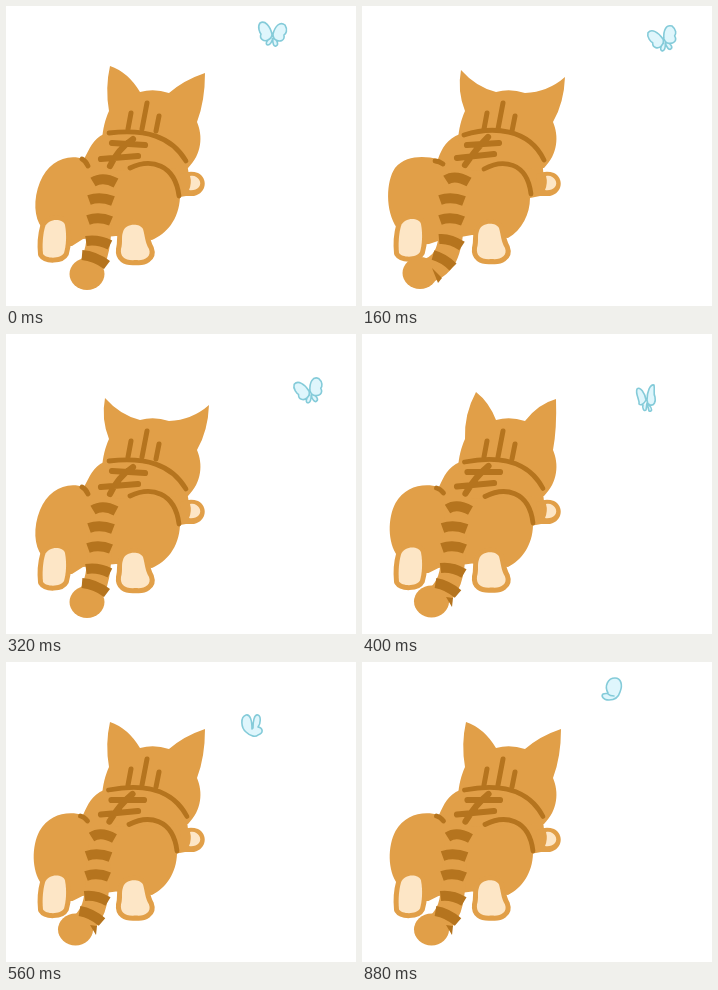
An HTML page with a canvas that plays this animation: 350x300 px, repeating every 0.96 s.

```html
<!DOCTYPE html>
<html>
<head>
<meta charset="utf-8">
<title>Cat watching a butterfly</title>
<style>
html, body { margin: 0; width: 100%; height: 100%; overflow: hidden; background: #fff; }
canvas { display: block; }
</style>
</head>
<body>
<canvas id="stage" width="350" height="300"></canvas>
<script>
const ctx = document.getElementById('stage').getContext('2d');
const FUR = '#e19f48', DARK = '#b5741e', CREAM = '#fde6c6', WING = '#dff6fc', EDGE = '#84cbd9';
const STEP = 80, STEPS = 12;

// Blend two path strings that share the same commands.
function mix(a, b, k) {
  const to = b.match(/-?[\d.]+/g);
  let i = 0;
  return a.replace(/-?[\d.]+/g, n => +n + (to[i++] - n) * k);
}

function fill(d, color) {
  ctx.fillStyle = color;
  ctx.fill(new Path2D(d));
}

function stroke(d, color, width, cap = 'round') {
  ctx.strokeStyle = color;
  ctx.lineWidth = width;
  ctx.lineCap = cap;
  ctx.lineJoin = 'round';
  ctx.stroke(new Path2D(d));
}

// Each pair is the body swung right and swung left.
const body = [
  'M98 128C87 133 84 142 78 153C60 147 42 156 34 176C27 193 28 212 36 222L38 240L66 240L77 233L110 230L146 234C160 228 173 214 174 191L186 189L180 150Z',
  'M98 128C85 133 80 142 76 153C62 150 44 149 33 162C24 175 23 205 35 222L38 240L67 238L76 235L110 229L146 232C160 224 168 208 168 192L183 189L180 150Z'];
const tail = [
  'M100 169C95 190 95 200 94 213C93 235 92 250 81 268',
  'M96 168C90 190 90 200 90 213C89 245 84 262 58 267'];
const stripes = [
  'M87 176Q97 170 110 177M83 194Q94 190 107 195M82 214Q93 210 105 215M80 235Q92 233 104 239M76 249Q89 250 101 259',
  'M84 174Q93 168 107 176M78 194Q89 190 102 195M78 214Q89 210 101 215M77 233Q88 232 100 240M71 249Q82 252 91 261'];
const tailWedge = ['M98 264L102 256L104 269Z', 'M70 262L80 272L76 277Z'];
const marks = [
  'M103 127C140 123 165 130 180 155M124 162C145 152 169 158 173 190M76 153Q80 155 82 160',
  'M102 129C130 120 167 122 182 154M122 163C140 153 165 155 169 188M73 155Q77 155 81 158'];
const spine = [
  'M127 133Q112 143 104 160M106 137L139 139M95 153L132 150',
  'M126 131Q114 143 103 159M105 139L137 137M95 152L132 148'];
const feet = [
  'M39 221C42 212 57 212 59 219C61 230 60 240 58 247C55 253 40 253 37 248C36 238 37 228 39 221Z',
  'M117 226C119 217 134 217 137 223C139 230 139 236 143 243C146 251 138 255 130 254C119 255 114 251 115 243C117 236 115 231 117 226Z'];

// Relaxed, flattened and perked ears: outer bend, tip, inner bend.
const ears = [
  { left: ['99 82', '104 60', '122 66'], right: ['178 74', '199 67', '199 95'] },
  { left: ['95 85', '99 64', '114 81'], right: ['186 86', '203 71', '202 97'] },
  { left: ['102 80', '114 58', '127 68'], right: ['176 70', '194 65', '195 95'] }];
const earSteps = [0, 0, 1, 1, 1, 2, 0, 0, 0, 0, 0, 0];

function drawCat(step) {
  const k = [0, .5, 1, .5][step % 4];
  const pose = pair => mix(...pair, k);

  fill(pose(body), FUR);
  fill('M175 168Q184 164 192 167C202 172 201 187 188 190L172 190Z', FUR);
  fill('M184 170C191 168 197 176 193 181Q189 185 183 184Q186 177 184 170Z', CREAM);

  const { left: l, right: r } = ears[earSteps[step]];
  fill(`M96 134C97 122 99 114 103 105Q${l[0]} ${l[1]}Q${l[2]} 134 86Q148 82 163 87` +
    `Q${r[0]} ${r[1]}Q${r[2]} 191 116C197 130 196 148 182 162L110 165Z`, FUR);

  ctx.save();
  ctx.translate(0, -k);
  for (const foot of feet) {
    stroke(foot, FUR, 10);
    fill(foot, CREAM);
  }
  ctx.restore();

  const tailPath = pose(tail);
  stroke(tailPath, FUR, 24, 'butt');
  const [x, y] = tailPath.match(/[\d.]+/g).slice(-2).map(Number);
  ctx.beginPath();
  ctx.ellipse(x, y, 17.5, 16, 0, 0, 7);
  ctx.fill();
  stroke(pose(stripes), DARK, 10, 'butt');
  if (k) fill(pose(tailWedge), DARK);

  stroke('M125 107L122 123M141 97L136 123M153 110L150 125', DARK, 5);
  stroke(pose(marks), DARK, 4.8);
  stroke(pose(spine), DARK, 6.2);
}

const wings = {
  open: 'M0 0C-2 -8 -7 -14 -12 -11C-15 -7 -12 -1 -11 0C-13 5 -8 8 -4 6C-2 5 0 3 0 0ZM1 0C3 -8 8 -13 13 -9C16 -4 14 0 12 1C13 7 8 8 4 6C2 5 1 3 1 0ZM-1 4C-6 6 -7 11 -4 11C-1 11 0 7 1 4C0 9 2 13 4 12C7 11 5 7 4 6',
  narrow: 'M0 2C-1 -5 -6 -12 -9 -9C-11 -4 -6 2 -7 6C-5 8 -2 6 0 2ZM1 2C1 -6 4 -14 8 -13C9 -8 7 -4 9 -1C10 4 8 8 4 7C2 6 1 4 1 2ZM-3 7C-4 10 -2 14 0 12L1 5M3 7C7 11 6 14 3 13L1 5',
  turned: 'M0 3C0 -6 -2 -12 -6 -11C-12 -9 -11 2 -6 6C-1 11 4 11 6 9C12 7 11 2 6 1C9 -3 9 -10 6 -11C2 -12 1 -4 1 2Z',
  side: 'M-4 3C-8 -4 -4 -12 3 -12C9 -12 11 -5 8 2C6 9 1 10 -3 10C-9 10 -11 6 -9 4C-7 3 -5 4 -4 3ZM-4 4C-2 6 0 6 2 6'
};
// x, y, wing pose, tilt in degrees
const flight = [
  [266, 28, 'open', 0], [285, 28, 'narrow', 0], [301, 33, 'open', -20], [314, 45, 'side', 0],
  [303, 57, 'open', -18], [284, 64, 'narrow', 0], [265, 67, 'open', 0], [246, 64, 'turned', 0],
  [233, 53, 'open', 0], [227, 39, 'narrow', 5], [236, 31, 'open', 0], [250, 28, 'side', 0]];

function drawButterfly(step) {
  const [x, y, pose, tilt] = flight[step];
  ctx.save();
  ctx.translate(x, y);
  ctx.rotate(tilt * Math.PI / 180);
  fill(wings[pose], WING);
  stroke(wings[pose], EDGE, 1.6);
  ctx.restore();
}

function frame() {
  const step = Math.floor(performance.now() / STEP) % STEPS;
  ctx.clearRect(0, 0, 350, 300);
  drawCat(step);
  drawButterfly(step);
  requestAnimationFrame(frame);
}
frame();
</script>
</body>
</html>
```
